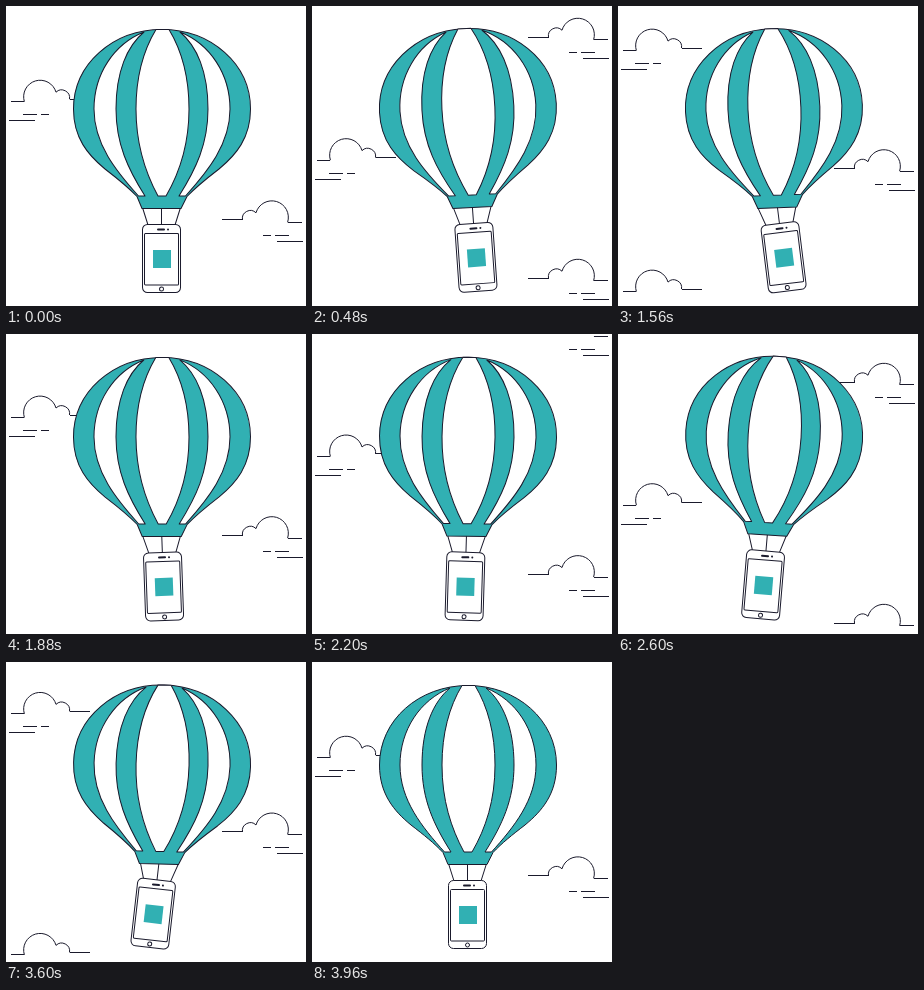
These frames come from a looping animation (300x300 px, 4000 ms). An HTML page without scripts:

```html
<!DOCTYPE html>
<html lang="en">
<head>
<meta charset="utf-8">
<title>Balloon carrying a phone</title>
<style>
  /* animated as values, so that every frame is drawn sharp */
  @property --drop { syntax: '<length>'; inherits: false; initial-value: 0px; }
  @property --lift { syntax: '<length>'; inherits: false; initial-value: 0px; }
  @property --lean { syntax: '<angle>'; inherits: false; initial-value: 0deg; }

  html, body { margin: 0; width: 100%; height: 100%; overflow: hidden; background: #fff; }
  svg { display: block; width: 100%; height: 100%; }

  .line { fill: none; stroke: #1a1a2c; stroke-width: 1; stroke-linejoin: round; }
  .level { shape-rendering: crispEdges; }
  .white { fill: #fff; }
  .teal { fill: #31b0b3; }
  .ink { fill: #1a1a2c; }

  .clouds {
    transform: translateY(var(--drop));
    animation: drift 4s steps(99, end) -1ms infinite;
  }
  .balloon {
    transform: translateY(var(--lift)) rotate(var(--lean));
    transform-origin: 156px 105px;
    animation: sway 4s cubic-bezier(.37, 0, .63, 1) -1ms infinite;
  }
  .payload {
    transform: rotate(var(--lean));
    transform-origin: 155.5px 201px;
    animation: swing 4s ease-in-out -1ms infinite;
  }

  /* two cloud spacings per loop, then a short hold */
  @keyframes drift {
    0% { --drop: 0px; }
    99%, 100% { --drop: 482px; }
  }

  @keyframes sway {
    0%, 49.5%, 99%, 100% { --lift: 0px; --lean: 0deg; }
    24.75% { --lift: -2px; --lean: -6deg; }
    74.25% { --lift: -1.7px; --lean: 5.2deg; }
  }

  /* the phone lags behind the balloon */
  @keyframes swing {
    0%, 49.5% { --lean: 0deg; animation-timing-function: ease-out; }
    8% { --lean: -1.3deg; }
    24% { --lean: -.3deg; }
    40% { --lean: -4.8deg; animation-timing-function: ease-in; }
    58% { --lean: 1.3deg; }
    75% { --lean: 1deg; }
    90% { --lean: 5deg; animation-timing-function: ease-in; }
    99%, 100% { --lean: 0deg; }
  }
</style>
</head>
<body>
<svg viewBox="0 0 300 300">
  <defs>
    <clipPath id="sky"><rect x="2" y="2" width="296" height="296"/></clipPath>
    <g id="cloud" class="line">
      <path d="M18.4 0A16.5 16.5 0 1 1 50-9.5A8 8 0 0 1 63.5-2.5"/>
      <path class="level" d="M4.500 0H18.4M63.500-2.500H84M17 13H31M35 13H43M3 19H29"/>
    </g>
    <g id="pair">
      <use href="#cloud" y="95.7"/>
      <use href="#cloud" transform="translate(300 216.3) scale(-1 1)"/>
    </g>
    <path id="panel" class="line white" d="M138 26C108 38 88 68 88 103C88 138 110 165 132.500 190H139C122 163 110 138 110 103C110 66 121 40 138 26Z"/>
  </defs>

  <g clip-path="url(#sky)">
    <g class="clouds">
      <use href="#pair"/>
      <use href="#pair" y="-241"/>
      <use href="#pair" y="-482"/>
    </g>
  </g>

  <g class="balloon">
    <g class="payload">
      <path class="line" d="M136 200L142 219M155.500 200V219M175 200L169 219"/>
      <rect class="line white" x="136.500" y="218.500" width="38" height="68" rx="5"/>
      <rect class="line" x="138.500" y="227.500" width="34" height="51.500" rx="1"/>
      <rect class="ink" x="151" y="222.500" width="8" height="2" rx="1"/>
      <circle class="ink" cx="162" cy="223.500" r="1"/>
      <circle class="line" cx="155.500" cy="283" r="2"/>
      <rect class="teal" x="147" y="244" width="18" height="18"/>
    </g>
    <path class="line teal" d="M156 23.500C107 23.500 67.500 58 67.500 103C67.500 132 82 149 99 163C112 173 122 181 131 190.500L136 202.500H175L181 190.500C190 181 200 173 213 163C230 149 244.500 132 244.500 103C244.500 58 205 23.500 156 23.500Z"/>
    <use href="#panel"/>
    <use href="#panel" transform="translate(312 0) scale(-1 1)"/>
    <path class="line white" d="M150 23.500C137 45 130 72 130 103C130 138 139 166 152 190H160C174 166 183 138 183 103C183 72 176 45 163 23.500Z"/>
  </g>
</svg>
</body>
</html>
```
